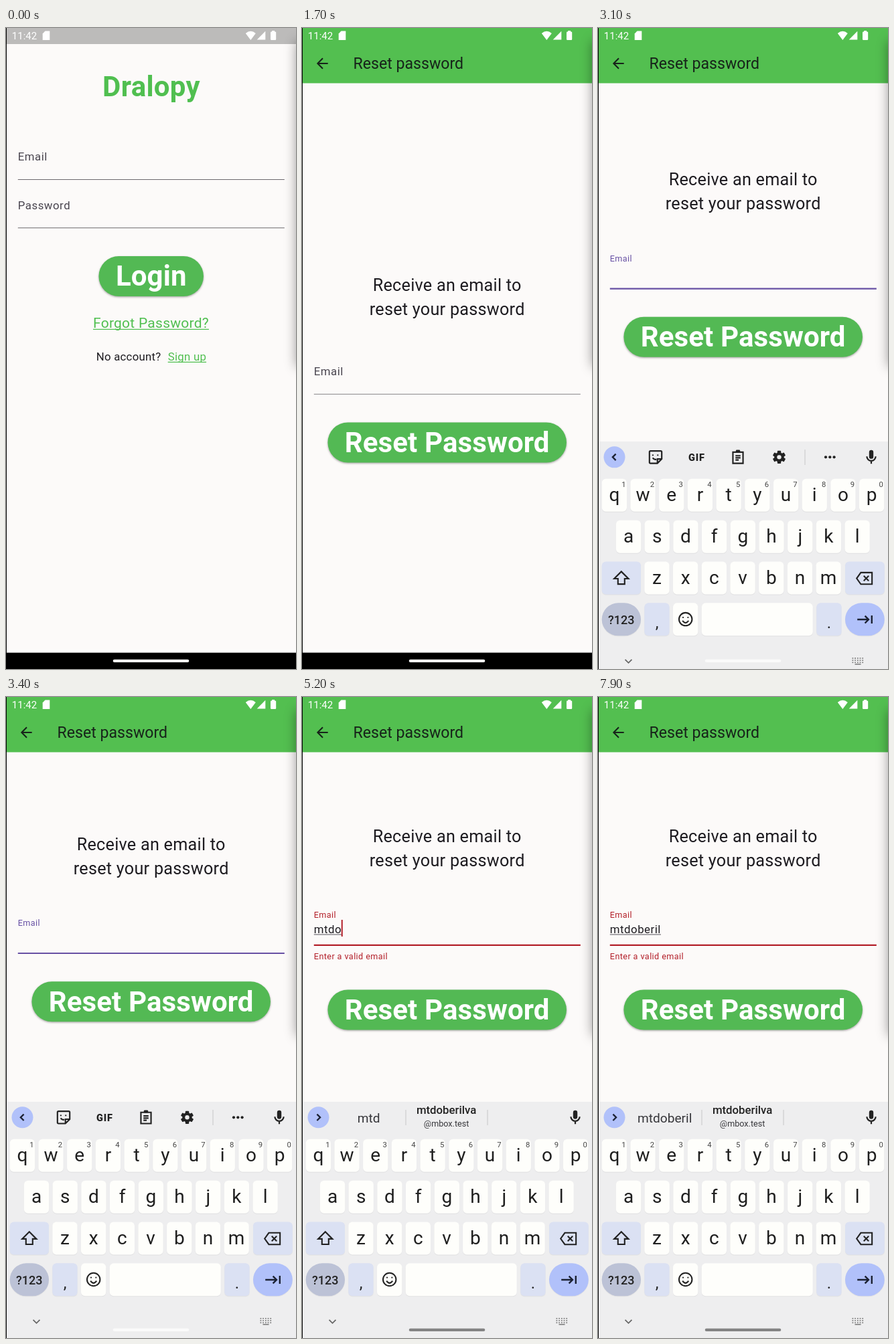
Animation of 433x958 px, one loop 8000 ms. Source, as an HTML page with a canvas:

```html
<!DOCTYPE html>
<html lang="en">
<head>
<meta charset="utf-8">
<title>Password reset</title>
<style>
html, body { margin: 0; width: 100%; height: 100%; overflow: hidden; background: #000; }
canvas { display: block; }
</style>
</head>
<body>
<canvas id="stage" width="433" height="958"></canvas>
<script>
const ctx = document.getElementById('stage').getContext('2d');
const W = 433, H = 958, NAV = 933.5, LOOP = 8000;
const MID = 216.7, LEFT = 17.8, LINE = 398, KEY_TOP = 605;
const BG = '#fcfaf9', GREEN = '#53bf50', BUTTON = '#53b954', INK = '#1d1b20';
const GREY = '#49454f', PURPLE = '#6750a4', RED = '#b3202a';
const WHITE_KEY = '#fefefb', SOFT_KEY = '#dbe1f3', BLUE = '#b1c1fa';

const USER = 'mtdoberilva', DOMAIN = '@mbox.test';
const TYPED_AT = [4600, 4800, 5000, 5200, 5400, 5600, 5700, 6000, 6200];

const ICONS = {
  back: 'M20 12H5.4M12.7 4.7 5.4 12l7.3 7.3',
  left: 'M14 7.5 9.5 12l4.5 4.5',
  right: 'M10 7.5l4.5 4.5-4.5 4.5',
  down: 'M7.5 10l4.5 4.5 4.5-4.5',
  shift: 'M12 4 3.5 12.5H8V19h8v-6.5h4.5z',
  erase: 'M7.5 5H21v14H7.5L2.5 12zM11 9l6 6M17 9l-6 6',
  next: 'M3 12h14M12.5 7.5 17 12l-4.5 4.5M21 7v10',
  clip: 'M5 5h14v15.5H5zM9 4h6M8.5 10h7M8.5 13h7M8.5 16h4.5',
  sticker: 'M5 3.5h14a1.5 1.5 0 0 1 1.5 1.5v9.5l-6 6H5A1.5 1.5 0 0 1 3.5 19V5A1.5 1.5 0 0 1 5 3.5zM14.5 20v-5.5H20M8 13q2 3 5 2M8.2 8.5v1.5M15 8.5v1.5',
  smile: 'M3 12a9 9 0 1 0 18 0a9 9 0 1 0-18 0M7.8 14q4.2 6 8.4 0M8.6 8.6v1.6M15.4 8.6v1.6',
  mic: 'M6 11a6 6 0 0 0 12 0M12 17v4'
};

const clamp = v => Math.max(0, Math.min(1, v));
const lerp = (a, b, p) => a + (b - a) * p;
const easeOut = p => 1 - Math.pow(1 - clamp(p), 3);

function rect(x, y, w, h, color, r = 0) {
  ctx.fillStyle = color;
  ctx.beginPath();
  ctx.roundRect(x, y, w, h, r);
  ctx.fill();
}

function disc(x, y, r, color) {
  ctx.fillStyle = color;
  ctx.beginPath();
  ctx.arc(x, y, r, 0, 7);
  ctx.fill();
}

function poly(color, ...pts) {
  ctx.fillStyle = color;
  ctx.beginPath();
  for (let i = 0; i < pts.length; i += 2) ctx.lineTo(pts[i], pts[i + 1]);
  ctx.fill();
}

// Returns the advance width of the text.
function text(s, x, y, size, color, { weight = 400, gap = 0, align = 'left' } = {}) {
  ctx.font = `${weight} ${size}px Roboto, sans-serif`;
  ctx.letterSpacing = gap + 'px';
  ctx.textAlign = align;
  ctx.fillStyle = color;
  ctx.fillText(s, x, y);
  return ctx.measureText(s).width;
}

function icon(name, x, y, scale, color = '#222', width = 2) {
  ctx.save();
  ctx.translate(x, y);
  ctx.scale(scale, scale);
  ctx.translate(-12, -12);
  ctx.strokeStyle = color;
  ctx.lineWidth = width;
  ctx.stroke(new Path2D(ICONS[name]));
  ctx.restore();
}

function button(label, y, w) {
  ctx.save();
  ctx.shadowColor = 'rgba(0,0,0,.35)';
  ctx.shadowBlur = 3;
  ctx.shadowOffsetY = 1.2;
  rect(MID - w / 2, y, w, 60, BUTTON, 30);
  ctx.restore();
  text(label, MID, y + 44.3, 42, '#fff', { weight: 700, gap: 0.1, align: 'center' });
}

function link(s, x, y, size) {
  const w = text(s, x, y, size, '#50bf50', { gap: 0.26 });
  rect(x, y + size * 0.085, w, 1.2, '#50bf50');
}

function loginPage() {
  rect(0, 0, W, NAV, BG);
  text('Dralopy', 217, 101.5, 42, '#50bf50', { weight: 700, gap: 0.26, align: 'center' });
  ['Email', 'Password'].forEach((label, i) => {
    text(label, LEFT, 198 + i * 72.5, 16.8, GREY, { gap: 0.525 });
    rect(LEFT, 226 + i * 72.3, LINE, 1.05, '#6b676d');
  });
  button('Login', 341, 156.5);
  link('Forgot Password?', 130, 448, 21);
  text('No account?', 134.7, 497.3, 16.8, INK, { gap: 0.26 });
  link('Sign up', 241.7, 497.3, 16.8);
}

function resetPage(s) {
  rect(0, 0, W, NAV, BG);
  rect(0, 0, W, 82.5, GREEN);
  icon('back', 30.3, 53, 1.05, '#17231a');
  text('Reset password', 76.6, 61, 23.1, '#17231a');

  const y = 393 - s.lift;
  const head = { gap: 0.26, align: 'center' };
  text('Receive an email to', MID, y, 25.2, INK, head);
  text('reset your password', MID, y + 36, 25.2, INK, head);

  const tint = s.error ? RED : s.focus ? PURPLE : GREY;
  const size = lerp(16.8, 12.6, s.focus);
  text('Email', LEFT, y + lerp(126, 113.3, s.focus), size, tint, { gap: size / 32 });
  const thick = s.focus ? 2.1 : 1.05;
  rect(LEFT, y + 154.3 - thick / 2, LINE, thick, s.focus ? tint : '#838085');

  if (s.count) {
    const w = text(USER.slice(0, s.count), LEFT, y + 136, 16.8, INK, { gap: 0.525 });
    rect(LEFT, y + 138, w, 1, '#55525a');
    if (s.caret) rect(LEFT + w - 0.4, y + 116.4, 2, 25, RED);
  }
  if (s.error) {
    ctx.globalAlpha = s.error;
    text('Enter a valid email', LEFT, y + 175, 12.6, RED, { gap: 0.42 });
    ctx.globalAlpha = 1;
  }
  button('Reset Password', y + 196.5 + s.error * 24.5, 356.5);
}

function gear(x, y) {
  ctx.save();
  ctx.translate(x, y);
  for (let i = 0; i < 6; i++) {
    rect(-2.7, -9.6, 5.4, 6, '#222', 1);
    ctx.rotate(Math.PI / 3);
  }
  disc(0, 0, 7.2, '#222');
  disc(0, 0, 3.2, '#eeeeef');
  ctx.restore();
}

function mic(x, y) {
  rect(x - 3.2, y - 10.5, 6.4, 13, '#222', 3.2);
  icon('mic', x, y, 1.1);
}

function toolbar(s) {
  const y = 628.3, found = s.found;
  disc(24.5, y, 16, BLUE);
  icon(found ? 'right' : 'left', 24.5, y, 1.05, '#1c2233', 2.2);
  mic(408, y);
  if (found) {
    if (s.press) rect(155, KEY_TOP, 122, 47, '#e4e4e6');
    rect(154.5, 617, 1, 23, '#c6c6c8');
    rect(276.5, 617, 1, 23, '#c6c6c8');
    text(USER.slice(0, found), 99.7, 636, 19.1, '#36363a', { align: 'center' });
    if (found > 2) {
      text(USER, 215.6, 623, 16.8, '#222', { weight: 500, align: 'center' });
      text(DOMAIN, 215.6, 641.5, 12.6, '#36363a', { align: 'center' });
    }
    return;
  }
  icon('sticker', 86, y, 1.08);
  text('GIF', 147.4, 633.5, 14.5, '#222', { weight: 900, gap: 0.9, align: 'center' });
  icon('clip', 209, y, 1.08);
  rect(206, 617.5, 6, 4, '#222', 1);
  gear(270.5, y);
  rect(308.5, 617, 1, 23, '#c6c6c8');
  for (let i = -1; i < 2; i++) disc(346.3 + i * 6.3, y, 2.1, '#222');
}

function key(x, y, w, color, r = 6) {
  ctx.save();
  ctx.shadowColor = 'rgba(0,0,0,.06)';
  ctx.shadowBlur = 1;
  ctx.shadowOffsetY = 1;
  rect(x, y, w, 49, color, r);
  ctx.restore();
}

function keyboard(s) {
  ctx.save();
  ctx.translate(0, s.keyTop - KEY_TOP);
  rect(0, KEY_TOP, W, 360, '#eeeeef');
  toolbar(s);

  const pitch = 42.7, kw = 37.3;
  const rows = [['qwertyuiop', 5.7, 660.7], ['asdfghjkl', 26.9, 722.7], ['zxcvbnm', 69.3, 784.5]];
  rows.forEach(([letters, x0, y], row) => {
    [...letters].forEach((c, i) => {
      const x = x0 + i * pitch;
      key(x, y, kw, WHITE_KEY);
      text(c, x + kw / 2, y + 33, 28, '#1f1f1f', { align: 'center' });
      if (!row) text((i + 1) % 10, x + 32.6, y + 12.5, 11.3, '#444', { align: 'center' });
    });
  });

  key(5.7, 784.5, 58.3, SOFT_KEY);
  icon('shift', 34.8, 809.3, 1.25, '#222', 1.7);
  key(369, 784.5, 58.8, SOFT_KEY);
  icon('erase', 398, 809.5, 1.24, '#222', 1.7);

  const y = 846.3;
  key(5.7, y, 58.3, '#bcc2d6', 24.5);
  text('?123', 34.8, 877.7, 18, '#222', { weight: 500, align: 'center' });
  key(69.3, y, kw, SOFT_KEY);
  text(',', 88, 884, 24, '#222', { align: 'center' });
  key(112, y, kw, WHITE_KEY);
  icon('smile', 130.7, 870.5, 1.08, '#222', 1.9);
  key(154.8, y, 166, WHITE_KEY);
  key(326.3, y, kw, SOFT_KEY);
  text('.', 345, 884, 24, '#222', { align: 'center' });
  key(369, y, 58.8, BLUE, 24.5);
  icon('next', 398, 871, 1.2, '#1c2233');

  icon('down', 45.5, 933, 1.1, '#666', 1.6);
  for (let i = 0; i < 15; i++) rect(379.5 + i % 5 * 3.7, 928 + (i / 5 | 0) * 3.2, 1.8, 1.6, '#777');
  rect(383.5, 937, 9, 1.5, '#777');
  ctx.restore();
}

function statusBar(shade) {
  if (shade) rect(0, 0, W, 24, 'rgba(0,0,0,.255)');
  text('11:42', 8.8, 17, 15, '#fff');
  poly('#fff', 58.5, 4.5, 65.3, 4.5, 65.3, 18, 54.7, 18, 54.7, 8.5);
  ctx.fillStyle = '#fff';
  ctx.beginPath();
  ctx.moveTo(365.3, 18);
  ctx.lineTo(357.8, 8);
  ctx.quadraticCurveTo(365.3, 1.6, 372.8, 8);
  ctx.fill();
  poly('#fff', 387.3, 4.7, 387.3, 17.5, 374.7, 17.5);
  rect(395, 5.5, 8.2, 12.5, '#fff', 1.2);
  rect(397.2, 4, 3.8, 3, '#fff');
}

function edgeShadow() {
  ctx.save();
  ctx.shadowColor = 'rgba(0,0,0,.42)';
  ctx.shadowBlur = 18;
  rect(434, 20, 40, 486, '#000');
  ctx.restore();
}

function stateAt(t) {
  const rise = easeOut((t - 2800) / 450);
  const keyTop = lerp(H, KEY_TOP, rise);
  const error = easeOut((t - 4500) / 300);
  const typedBy = time => TYPED_AT.filter(at => at <= time).length;
  return {
    keyTop, error,
    focus: easeOut((t - 2600) / 300),
    lift: Math.max(0, (NAV - keyTop) / 2) + error * 12.2,
    count: typedBy(t),
    found: typedBy(t - 100),
    caret: t < 6600 || Math.floor((t - 6600) / 500) % 2 === 1,
    press: t === 7800
  };
}

function draw(t) {
  const s = stateAt(t);
  const open = clamp((t - 1316) / 300);
  const entered = t >= 1400;

  ctx.fillStyle = '#000';
  ctx.fillRect(0, 0, W, H);
  ctx.save();
  ctx.beginPath();
  ctx.rect(1, 0, W, NAV);
  ctx.clip();
  if (open < 1) loginPage();
  if (entered) {
    rect(0, 0, W, NAV, `rgba(0,0,0,${clamp((open - 0.207) / 0.21) * 0.6})`);
    const scale = 1 - 0.047 * Math.pow((1 - open) / 0.72, 2.6);
    ctx.translate(MID, NAV / 2);
    ctx.scale(scale, scale);
    ctx.translate(-MID, -NAV / 2);
    ctx.beginPath();
    ctx.rect(1, 0, W - 1, NAV);
    ctx.clip();
    resetPage(s);
  }
  ctx.restore();
  if (!entered || open === 1) rect(1, 929.5, W, NAV - 929.5, '#fff');

  statusBar(t < 1600);
  if (s.keyTop < H) keyboard(s);
  const pill = Math.round(lerp(250, 132, clamp((t - 3600) / 500)));
  rect(159.7, 943.8, 113.6, 4.2, `rgb(${pill},${pill},${pill})`, 2.1);
  edgeShadow();
  rect(0, 0, 1, H, '#000');
}

// The screen refreshes ten times a second.
const start = performance.now();
function tick() {
  const t = (performance.now() - start) % LOOP;
  draw(Math.floor(t / 100) * 100);
  requestAnimationFrame(tick);
}
tick();
</script>
</body>
</html>
```
